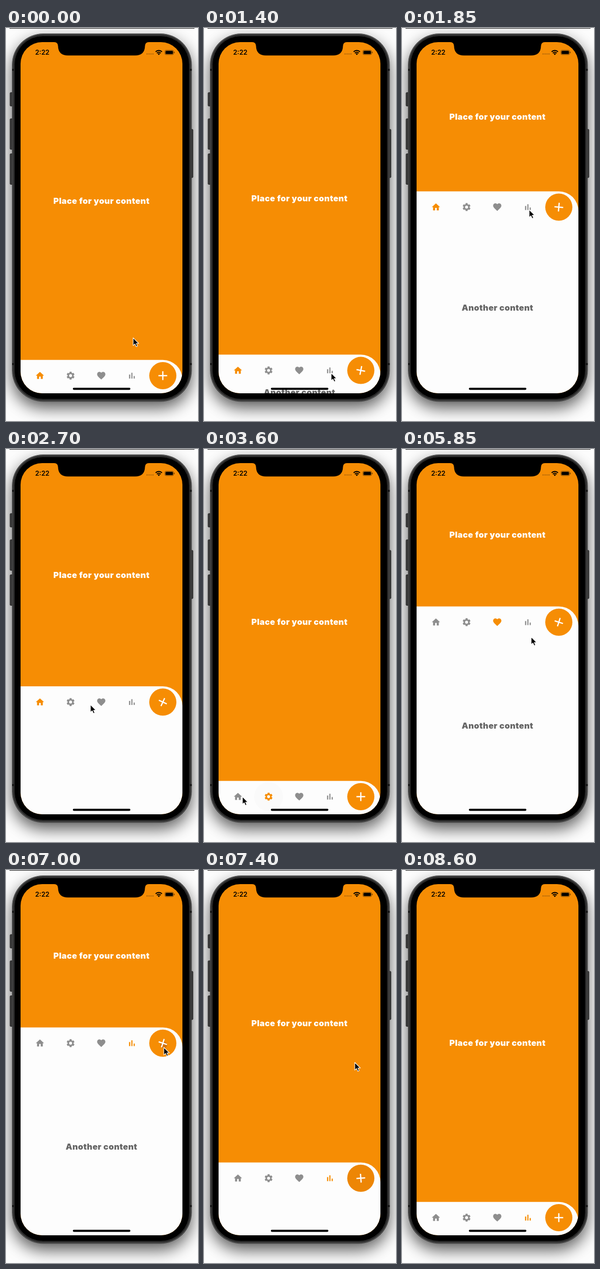
Recreate the animation shown at these times as an HTML page. Size 382 by 780 pixels, loop 8.65 s.

```html
<!DOCTYPE html>
<html lang="en">
<head>
<meta charset="utf-8">
<title>Bottom bar with sheet</title>
<style>
  html, body { margin: 0; width: 100%; height: 100%; overflow: hidden; background: #fdfdfd; }
  #stage { position: relative; width: 382px; height: 780px; overflow: hidden; }
  #shadow { position: absolute; left: 12px; top: 11px; width: 357px; height: 730px;
    border-radius: 62px; box-shadow: 0 13px 32px rgba(0, 0, 0, .66); }
  svg { position: absolute; left: 0; top: 0; display: block; }
  text { font-family: Inter, sans-serif; }
  .big { font-size: 16.5px; font-weight: 900; letter-spacing: .4px; text-anchor: middle; }
</style>
</head>
<body>
<div id="stage">
  <div id="shadow"></div>
  <svg width="382" height="780" viewBox="0 0 382 780">
    <defs>
      <clipPath id="screen"><rect x="29" y="28" width="322" height="697" rx="43"/></clipPath>
      <clipPath id="disc"><circle cx="312" cy="31.3" r="27"/></clipPath>
    </defs>

    <rect x="7" width="368" height="1.2" fill="#333"/>
    <g fill="#3a3a3a" stroke="#1c1c1c" stroke-width=".8">
      <rect x="8" y="128" width="6" height="27" rx="1.5"/>
      <rect x="8" y="180" width="6" height="61" rx="1.5"/>
      <rect x="8" y="249.500" width="6" height="61" rx="1.5"/>
      <rect x="367" y="201" width="5" height="96" rx="1.5"/>
    </g>
    <rect x="12" y="11" width="357.500" height="730.500" rx="62" fill="#252525"/>
    <rect x="13.500" y="12.500" width="354.500" height="727.500" rx="60.500" fill="none" stroke="#555" stroke-width="1.4"/>
    <rect x="16.500" y="15.500" width="348.500" height="721.500" rx="57" fill="#000" stroke="#3a3a3a"/>
    <path d="M12 83h4M12 667h4M365.500 83h4M365.500 667h4" stroke="#161616" stroke-width="4"/>

    <g clip-path="url(#screen)">
      <rect x="29" y="28" width="322" height="697" fill="#f68d04"/>
      <text id="title" class="big" x="190" fill="#fff">Place for your content</text>
      <g id="bar">
        <path d="M29 0H312A39 39 0 0 1 351 39V460H29Z" fill="#fdfdfd"/>
        <circle id="splash" cy="31.3" fill="#000"/>
        <g id="tabs"></g>
        <circle cx="312" cy="31.3" r="27" fill="#f68d04"/>
        <g clip-path="url(#disc)"><circle id="ripple" fill="#8f3d10"/></g>
        <path id="plus" d="M-8.700 0H8.700M0-8.700V8.700" stroke="#fff" stroke-width="2.5"/>
      </g>
      <text id="more" class="big" x="190" fill="#666">Another content</text>
      <rect x="133" y="714" width="114.500" height="4.200" rx="2.100"/>
    </g>

    <path d="M96 27V28Q103 28 103.500 35.500Q104 54.500 123 54.500H257Q276 54.500 276.500 35.500Q277 28 284 28V27Z"/>
    <text x="58" y="53" font-size="13" font-weight="600">2:22</text>
    <path d="M279.500 51.500H294" stroke="#a9640c" stroke-width="2.200" stroke-dasharray="2.400 1.500"/>
    <g fill="none" stroke="#000" stroke-width="2.100">
      <path d="M297.700 47.200A9 9 0 0 1 310.300 47.200M300.200 49.900A5.500 5.500 0 0 1 307.800 49.900"/>
    </g>
    <path d="M304 53.700L301.800 51.400A3.100 3.100 0 0 1 306.200 51.400Z"/>
    <rect x="316" y="44" width="17.500" height="9" rx="2.600" fill="none" stroke="#7d4a08" stroke-width=".9"/>
    <rect x="317.300" y="45.300" width="14.900" height="6.400" rx="1.500"/>
    <path d="M334.800 47v3" stroke="#7d4a08" stroke-width="1.300"/>

    <path id="cursor" d="M0 0V15.200L3.500 12L6 17.500L8.600 16.300L6.200 11H11Z" stroke="#fff" stroke-width="1.100" stroke-linejoin="round"/>
  </svg>
</div>
<script>
const LOOP = 8650, STEP = 50;
const CLOSED = 658.7, TRAVEL = 346.3, TURN = 378;
const DRAG_END = 2950, OPEN_AT = 5187, CLOSE_AT = 7054, SLIDE = 500;

const $ = id => document.getElementById(id);
const clamp = x => Math.max(0, Math.min(1, x));
const linear = x => x;
const smooth = x => x * x * (3 - 2 * x);

const icons = [
  [67.5, 'M10 20v-6h4v6h5v-8h3L12 3 2 12h3v8z'],
  [128.5, 'M19.140 12.940c.04-.3.060-.61.060-.94s-.020-.64-.070-.94l2.030-1.580c.180-.140.230-.41.120-.61l-1.920-3.320c-.12-.22-.37-.29-.59-.22l-2.390.96c-.5-.38-1.030-.7-1.620-.94l-.36-2.540c-.04-.24-.24-.41-.48-.41h-3.840c-.24 0-.43.17-.47.41l-.36 2.540c-.59.24-1.130.57-1.620.94l-2.390-.96c-.22-.08-.47 0-.59.22L2.740 8.870c-.12.21-.08.47.12.61l2.030 1.580c-.05.3-.09.63-.09.94s.02.64.07.94l-2.030 1.580c-.18.14-.23.41-.12.61l1.920 3.320c.12.22.37.29.59.22l2.390-.96c.5.38 1.030.7 1.620.94l.36 2.540c.05.24.24.41.48.41h3.840c.24 0 .44-.17.47-.41l.36-2.540c.59-.24 1.130-.56 1.620-.94l2.390.96c.22.08.47 0 .59-.22l1.920-3.320c.12-.22.07-.47-.12-.61zM12 15.600a3.600 3.600 0 1 1 0-7.200a3.600 3.600 0 0 1 0 7.200z'],
  [189.5, 'M12 21.350l-1.450-1.320C5.400 15.360 2 12.280 2 8.500 2 5.420 4.420 3 7.500 3c1.740 0 3.410.81 4.500 2.090C13.090 3.810 14.760 3 16.500 3 19.580 3 22 5.420 22 8.500c0 3.780-3.400 6.860-8.550 11.540z'],
  [250.5, 'M5 9.200h3V19H5zM10.600 5h2.800v14h-2.800zM16.200 13H19v6h-2.800z']
];
const tabs = icons.map(([x, d]) => {
  const p = document.createElementNS('http://www.w3.org/2000/svg', 'path');
  p.setAttribute('d', d);
  p.setAttribute('transform', `translate(${x} 31.3) scale(.82) translate(-12 -12)`);
  return $('tabs').appendChild(p);
});

// [time, openness] while the bar is dragged
const drag = [[550, 0], [950, .9], [1000, .9], [1400, .03], [1450, .03], [1850, .966],
  [2050, 1], [2450, .99], [2700, .542], [DRAG_END, 0]];
// [time, x, y]; y follows the bar during the drag
const pointer = [[0, 253, 615], [300, 253, 695.2], [2050, 253, 0], [2450, 168, 0],
  [DRAG_END, 168, 695.2], [3200, 132, 690], [3350, 132, 690], [3650, 72, 690],
  [3750, 72, 690], [4250, 190, 690], [4500, 190, 690], [4950, 322, 682],
  [5250, 322, 682], [5850, 257, 373], [6050, 251, 346], [6300, 251, 346],
  [6800, 314, 352], [7080, 314, 352], [7400, 300, 382]];
// [time, tab]
const taps = [[0, 0], [3250, 1], [3850, 0], [4400, 2], [6150, 3]];
// [time, x, y in the bar]
const presses = [[5060, 322, 24], [6980, 314, 35]];

function track(keys, t, ease) {
  const i = keys.findIndex(k => k[0] > t);
  if (i === 0) return keys[0].slice(1);
  if (i < 0) return keys[keys.length - 1].slice(1);
  const a = keys[i - 1], b = keys[i];
  const u = ease((t - a[0]) / (b[0] - a[0]));
  return a.slice(1).map((v, n) => v + (b[n + 1] - v) * u);
}

const last = (list, t) => list.filter(e => e[0] <= t).pop();

function set(el, attrs) {
  for (const k in attrs) el.setAttribute(k, attrs[k]);
}

function openness(t) {
  if (t < OPEN_AT) return track(drag, t, linear)[0];
  return smooth(clamp((t - OPEN_AT) / SLIDE)) - smooth(clamp((t - CLOSE_AT) / SLIDE));
}

function draw(t) {
  const s = openness(t), top = CLOSED - TRAVEL * s;
  const opening = t >= OPEN_AT && t < OPEN_AT + SLIDE;
  const angle = TURN * (opening ? (t - OPEN_AT) / SLIDE : s);
  set($('bar'), { transform: `translate(0 ${top})` });
  set($('plus'), { transform: `translate(312 31.3) rotate(${angle})` });
  set($('title'), { y: (28 + top) / 2 + 6 });

  const shown = (t >= 550 && t < 1000) || (t >= 1400 && t < 2450) || (t >= OPEN_AT && t < CLOSE_AT);
  set($('more'), { y: 549 + (top - 312.4) * .518 + 6, visibility: shown ? 'visible' : 'hidden' });

  const [tapped, active] = last(taps, t);
  tabs.forEach((p, i) => set(p, { fill: i === active ? '#f68d04' : '#8e8e8e' }));
  const w = tapped ? clamp((t - tapped) / 400) : 1;
  set($('splash'), { cx: icons[active][0], r: 8 + 24 * w, opacity: .08 * (1 - w) });

  const press = last(presses, t);
  const q = press ? clamp((t - press[0]) / 480) : 1;
  set($('ripple'), { cx: press ? press[1] : 0, cy: press ? press[2] : 0,
    r: 5 + 40 * q, opacity: .32 * Math.min(1, 2.2 * (1 - q)) });

  const [x, y] = track(pointer, t, smooth);
  const held = t > 300 && t < DRAG_END;
  set($('cursor'), { transform: `translate(${x} ${held ? top + 36.5 : y})`,
    visibility: t < 8300 ? 'visible' : 'hidden' });
}

const start = performance.now();
function tick() {
  const t = (performance.now() - start) % LOOP;
  draw(Math.floor(t / STEP) * STEP);
  requestAnimationFrame(tick);
}
draw(0);
requestAnimationFrame(tick);
</script>
</body>
</html>
```
